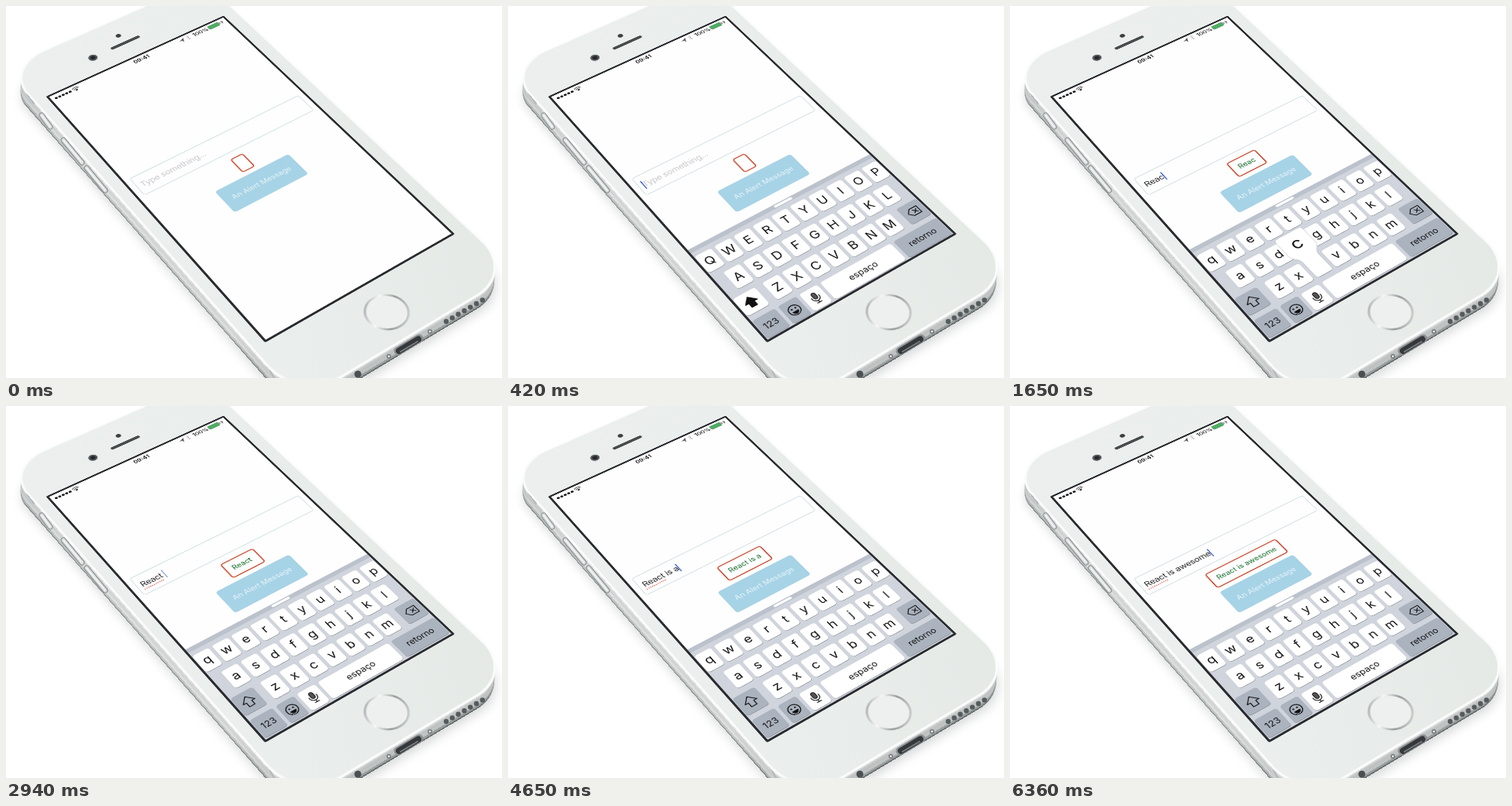
Write an HTML page that moves like this. It is 640 px wide and 480 px high and loops after 6.42 s.

```html
<!DOCTYPE html>
<html lang="en">
<head>
<meta charset="utf-8">
<title>Typing on a phone</title>
<style>
html, body { margin: 0; width: 100%; height: 100%; overflow: hidden; background: #fff; }
#stage { position: relative; width: 640px; height: 480px; overflow: hidden; }
#stage > * { position: absolute; left: 0; top: 0; }
.slab { width: 427px; height: 898px; border-radius: 80px; transform-origin: 0 0; }
svg { font-family: Inter, Roboto, sans-serif; }
#phone { overflow: visible; transform-origin: 0 0; }
text { white-space: pre; text-anchor: middle; }
#field { text-anchor: start; }
</style>
</head>
<body>
<div id="stage"></div>
<script>
const LOOP = 6420, W = 375, H = 667;
const stage = document.getElementById('stage');
const $ = id => document.getElementById(id);

// Screen plane in points, mapped onto four corners of the stage.
function planeMatrix([x0, y0], [x1, y1], [x2, y2], [x3, y3]) {
  const sx = x0 - x1 + x2 - x3, sy = y0 - y1 + y2 - y3;
  const ax = x1 - x2, ay = y1 - y2, bx = x3 - x2, by = y3 - y2;
  const den = ax * by - bx * ay;
  const g = (sx * by - bx * sy) / den, h = (ax * sy - sx * ay) / den;
  return `matrix3d(${[
    (x1 - x0 + g * x1) / W, (y1 - y0 + g * y1) / W, 0, g / W,
    (x3 - x0 + h * x3) / H, (y3 - y0 + h * y3) / H, 0, h / H,
    0, 0, 1, 0, x0, y0, 0, 1]})`;
}
const plane = planeMatrix([53.5, 117], [280.5, 13.7], [577, 294], [334.7, 432.5]);

const rect = (x, y, w, h, r, fill, more = '') =>
  `<rect x="${x}" y="${y}" width="${w}" height="${h}" rx="${r}" fill="${fill}" ${more}/>`;
const circle = (x, y, r, fill, more = '') =>
  `<circle cx="${x}" cy="${y}" r="${r}" fill="${fill}" ${more}/>`;
const path = (d, fill, more = '') => `<path d="${d}" fill="${fill}" ${more}/>`;
const label = (x, y, size, s, fill, more = '') =>
  `<text x="${x}" y="${y}" font-size="${size}" fill="${fill}" ${more}>${s}</text>`;
const pen = (color, width) => `stroke="${color}" stroke-width="${width}" stroke-linecap="round" stroke-linejoin="round"`;

// Phone body: soft shadow, then stacked slabs for the metal side.
const DEPTH = 18;
function slab(dx, dy, fill, more = '') {
  return `<div class="slab" style="background:${fill};transform:translate(${dx}px,${dy}px) ${plane} translate(-24px,-110px);${more}"></div>`;
}
const gray = l => `hsl(170 3% ${l}%)`;
function metal(k) {
  const l = k > 16 ? 60 : k > 13 ? 76 : k > 9 ? 87 : k > 4 ? 83 : k > 2 ? 89 : 97;
  return `linear-gradient(${gray(l - 8)},${gray(l)} 25%,${gray(l)} 80%,${gray(l - k)})`;
}
let body = slab(1, 23, '#5a6062', 'filter:blur(9px);opacity:.25');
for (let k = DEPTH; k > 0; k--) body += slab(-k / DEPTH, k, metal(k));

const sideButton = d => path(d, 'none', pen('#888d8f', 7)) + path(d, 'none', pen('#d9dcdc', 5)) +
  path(d, 'none', pen('#f7f8f8', 1.5));
const speaker = Array.from({ length: 7 }, (_, i) =>
  circle(568 + i * 7.8, 407 - i * 4.6, 3.2, '#565b5d')).join('');
const details = `<svg width="640" height="480">
  ${sideButton('M46 141L57 156')}${sideButton('M74 173L98 202')}${sideButton('M104 209L128 238')}
  ${path('M27 113L36 126M336 462L346 480', 'none', pen('#b4b8b9', 2))}
  ${speaker}
  ${path('M506 445L533 429', 'none', pen('#8d9294', 11))}${path('M507 445L532 430', 'none', pen('#34383a', 8))}
  ${path('M509 446L531 433', 'none', pen('#777c7e', 2))}
  ${[[494, 452], [547, 420]].map(([x, y]) => circle(x, y, 3, '#7c8183') + circle(x, y, 1.3, '#eee')).join('')}
  ${circle(454, 475, 4.5, '#4b5052')}
</svg>`;

// Keyboard
const KEY_TOP = 441, GRAY = '#abb3bf', INK = '#111';
const ROWS = ['qwertyuiop', 'asdfghjkl', 'zxcvbnm'];
const keys = {};
ROWS.forEach((row, r) => [...row].forEach((c, i) =>
  keys[c] = { x: [18.75, 37.5, 75][r] + i * 37.5, y: 480 + r * 54 }));
const keyCap = (x, y, w, fill, id = '') =>
  rect(x, y - 20, w, 42, 5, '#898d94') + rect(x, y - 21, w, 42, 5, fill, id && `id="${id}"`);
const letterKeys = Object.entries(keys).map(([c, { x, y }]) =>
  keyCap(x - 15.75, y, 31.5, '#fff') + label(x, y + 8, 23, c, INK, `class="letter" data-c="${c}"`)).join('');
const keyboard = `<g id="keyboard">
  ${rect(0, KEY_TOP, W, 260, 0, '#d0d4dc')}${rect(0, KEY_TOP, W, 9, 0, '#bcc2cc')}
  ${rect(169.5, 443, 36, 5, 2.5, '#fff')}
  ${letterKeys}
  ${keyCap(3, 588, 42, '#fff', 'shiftKey')}
  ${path('M24 577L35 589H29V598H19V589H13Z', INK, `id="shiftArrow" ${pen(INK, 1.6)}`)}
  ${keyCap(330, 588, 42, GRAY)}
  ${path('M340 588L347 580H362V596H347ZM351 584.5L358 591.5M358 584.5L351 591.5', 'none', pen(INK, 1.6))}
  ${keyCap(3, 641, 43, GRAY)}${label(24.5, 647, 16, '123', INK)}
  ${keyCap(52, 641, 35, GRAY)}
  ${circle(69.5, 641, 10, 'none', pen(INK, 1.6))}${circle(66, 638, 1.6, INK)}${circle(73, 638, 1.6, INK)}
  ${path('M63.5 643H75.5Q74 649 69.5 649T63.5 643', INK)}
  ${keyCap(93, 641, 35, '#fff')}
  ${rect(107.5, 630, 7, 13, 3.5, '#555', pen(INK, 1.4))}
  ${path('M104 638V640A7 7 0 0 0 118 640V638M111 647V651M107 651H115', 'none', pen(INK, 1.5))}
  ${keyCap(134, 641, 142, '#fff', 'space')}${label(205, 646, 16, 'espaço', INK)}
  ${keyCap(282, 641, 90, GRAY)}${label(327, 646, 16, 'retorno', INK)}
  <g id="popup">
    ${path('M-20-83H20Q27-83 27-76V-42C27-32 15.75-30 15.75-18V16Q15.75 21 11 21H-11Q-15.75 21-15.75 16V-18C-15.75-30-27-32-27-42V-76Q-27-83-20-83Z', '#fff', 'stroke="#9aa0a8" stroke-opacity=".5"')}
    ${label(0, -46, 33, '', INK, 'id="popupText"')}
  </g>
</g>`;

const status = `
  ${[0, 1, 2, 3, 4].map(i => circle(11 + i * 7, 12, 2.6, INK)).join('')}
  ${path('M45 9.5Q51 4.5 57 9.5M47 12Q51 8.8 55 12', 'none', pen('#333', 1.5))}${path('M48.5 14Q51 12 53.5 14L51 17Z', INK)}
  ${label(187.5, 16, 12, '09:41', INK, 'font-weight="600"')}
  ${path('M270 12L281 7L276 18L275.5 12.5Z', '#555')}
  ${path('M286 9L292 15L289 18V6L292 9L286 15', 'none', pen('#aaa', 1))}
  ${label(316, 16, 12, '100%', INK, 'font-weight="500"')}
  ${rect(334, 6.5, 23, 10, 2, '#4caf62', 'stroke="#7d8a80" stroke-width=".8"')}
  ${path('M359 9.5V13.5', 'none', pen('#666', 1.5))}${path('M365 6L361.5 12H364L362.5 17L367 10.5H364.5Z', '#555')}`;

const screen = `<svg width="${W}" height="${H}" viewBox="0 0 ${W} ${H}">
  ${rect(0, 0, W, H, 0, '#fefefe')}
  ${status}
  ${rect(12.5, 255, 350, 46, 4, '#fefefe', 'stroke="#cddde3" stroke-width="1.3"')}
  <text id="field" x="20" y="284.5" font-size="16" letter-spacing="-.4"></text>
  ${path('M21 290H60', 'none', 'id="typo" stroke="#d9534a" stroke-width="2.2" stroke-linecap="round" stroke-dasharray="0 3.6"')}
  ${rect(20, 268, 2, 21, 1, '#4169d8', 'id="caret"')}
  ${rect(0, 316.5, 24, 36, 4, 'none', 'id="box" stroke="#cb4426" stroke-width="2.2"')}
  ${label(187.5, 340, 14, '', '#2f7d43', 'id="echo" font-weight="500"')}
  <g id="button">${rect(112, 362.5, 151, 58, 5, '#a7d3e6')}${label(187.5, 396.5, 14.2, 'An Alert Message', '#e6f4fa')}</g>
  ${keyboard}
</svg>`;

const face = `<svg id="phone" width="${W}" height="${H}">
  <defs><linearGradient id="shell" x1="0" y1="0" x2="1" y2="1">
    <stop offset="0" stop-color="#ecefed"/><stop offset=".5" stop-color="#eaeeec"/><stop offset="1" stop-color="#e4e9e6"/>
  </linearGradient>
  <linearGradient id="ring" x1="0" y1="0" x2="1" y2="1">
    <stop offset="0" stop-color="#8b9090"/><stop offset=".35" stop-color="#f8f9f9"/>
    <stop offset=".6" stop-color="#979c9c"/><stop offset="1" stop-color="#e4e7e6"/>
  </linearGradient></defs>
  ${rect(-24, -110, 427, 898, 80, 'url(#shell)', 'stroke="#fafbfb" stroke-width="4"')}
  ${circle(187, -67, 5, '#3c4043')}
  ${circle(118, -42, 8.5, '#5a5e61')}${circle(118, -42, 5, '#25292c')}
  ${rect(157, -47, 61, 7, 3.5, '#484c4e')}
  ${circle(186, 731, 34, '#edf0ee', 'stroke="url(#ring)" stroke-width="4"')}
  ${screen}
  ${rect(0, 0, W, H, 1, 'none', 'stroke="#2a2c30" stroke-width="4"')}
</svg>`;

stage.innerHTML = body + details + face;
$('phone').style.transform = plane;

// Key presses: the character lands shortly after the touch begins.
const TEXT = 'React is awesome';
const PRESS = [900, 1110, 1320, 1560, 2010, 2250, 2970, 3200, 3900, 4530, 4860, 5190, 5370, 5550, 5720, 6180];
const COMMIT = 75, HOLD = 120, FOCUS = 165;
const clamp = v => Math.min(1, Math.max(0, v));
const set = (id, attrs) => { for (const k in attrs) $(id).setAttribute(k, attrs[k]); };
const show = (id, on) => set(id, { visibility: on ? 'visible' : 'hidden' });
const letters = document.querySelectorAll('.letter');

function caretAlpha(idle) {
  const p = idle % 1000;
  return Math.max(1 - clamp((p - 350) / 90), clamp((p - 570) / 80));
}

function draw(t) {
  const n = PRESS.filter(p => t >= p + COMMIT).length;
  const typed = TEXT.slice(0, n), upper = n === 0;

  const w = Math.max(0, t - FOCUS) * .029;
  const drop = (H - KEY_TOP + 4) * (1 + w) * Math.exp(-w);
  set('keyboard', { transform: `translate(0 ${drop < .3 ? 0 : drop})` });
  letters.forEach(k => {
    const c = k.dataset.c;
    k.textContent = upper ? c.toUpperCase() : c;
    k.setAttribute('y', keys[c].y + (upper ? 8 : 7));
  });
  set('shiftKey', { fill: upper ? '#fff' : GRAY });
  set('shiftArrow', { fill: upper ? INK : 'none' });

  const i = PRESS.findIndex(p => t >= p && t < p + HOLD);
  const key = keys[(TEXT[i] || '').toLowerCase()];
  show('popup', key);
  if (key) {
    set('popup', { transform: `translate(${key.x} ${key.y})` });
    $('popupText').textContent = TEXT[i];
  }
  set('space', { fill: TEXT[i] === ' ' ? GRAY : '#fff' });

  $('field').textContent = typed || 'Type something...';
  set('field', { fill: n ? '#222' : '#c7c7cd' });
  show('typo', n > 5);
  const caretX = 20 + (n ? $('field').getComputedTextLength() : 0);
  const idle = t - (n ? PRESS[n - 1] + COMMIT : 180);
  set('caret', { x: caretX, opacity: idle < 0 ? 0 : caretAlpha(idle) });

  $('echo').textContent = typed;
  const boxW = 24 + (n ? $('echo').getComputedTextLength() : 0);
  set('box', { x: W / 2 - boxW / 2, width: boxW, height: n ? 37.5 : 36 });
  set('button', { transform: `translate(0 ${n ? 1.5 : 0})` });
}

function tick() {
  draw(performance.now() % LOOP);
  requestAnimationFrame(tick);
}
tick();
</script>
</body>
</html>
```
